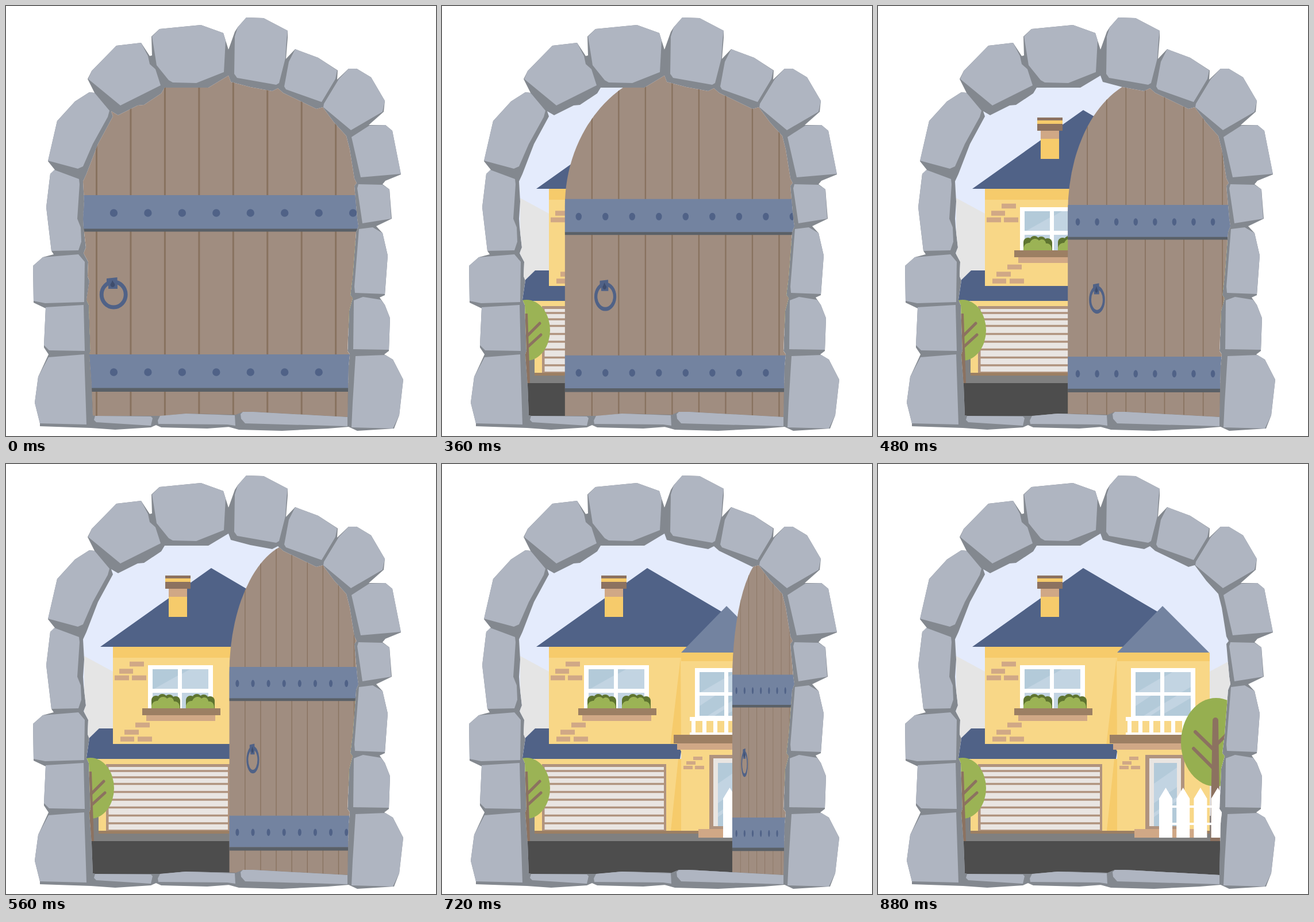
Animation of 748x748 px, one loop 920 ms. Source, as an HTML page:

```html
<!DOCTYPE html>
<html lang="en">
<head>
<meta charset="utf-8">
<title>Opening door</title>
<style>
html, body { margin: 0; width: 100%; height: 100%; overflow: hidden; background: #fff; }
svg { display: block; width: 100vw; height: 100vh; }
.wall { fill: #f8d787; } .trim { fill: #f6cb6b; }
.roof { fill: #506287; } .tan { fill: #d0a886; }
.brown { fill: #9c7f63; } .bark { fill: #8c7260; }
.frame { fill: #b0937e; } .pale { fill: #e9e5e2; }
.white { fill: #fff; } .fog { fill: #e5e5e5; }
.glass { fill: #b3cad9; } .shine { fill: #c2d4e2; }
.leaf { fill: #9bb355; } .shade { fill: #5e7430; }
.band { fill: #7383a0; } .edge { fill: #5a6067; }
.stone { fill: #afb5c1; } .gap { fill: #83888f; }
.line { fill: none; stroke: #8c7260; stroke-linecap: round; }
</style>
</head>
<body>
<svg viewBox="0 0 748 748">
  <clipPath id="opening"><path d="M387 121L391 132 425 141 463 148 473 143 482 151 540 179 551 176 571 203 592 226 598 250 606 300 610 308 606 313 611 370 613 383 609 393 603 470 599 503 603 508 597 530 594 600 598 606 596 625 594 715 430 706 412 706 400 711 313 709 272 713 155 713 151 712 149 660 145 606 147 600 144 520 140 511 145 478 142 470 143 445 135 430 139 420 135 385 134 370 136 340 134 305 140 292 160 240 186 192 183 183 195 190 229 173 240 172 270 152 276 142 352 142Z"/></clipPath>
  <clipPath id="arch"><path d="M97.3 740V342A267.5 246 0 0 1 632.4 342V740Z"/></clipPath>

  <g class="gap">
    <path d="M59 731L59 726 50 690 56 645 74 606 66 594 66 590 69 526 48 516 47 452 64 437 83 432 79 426 70 350 77 292 85 285 73 270 89 200 120 166 145 150 154 151 142 127 149 113 192 69 235 64 250 87 254 86 253 53 267 40 339 33 378 47 387 76 390 70V732L350 735 270 733 261 729 252 733 190 737 148 734Z"/>
    <path d="M387 76L398 45 403 37 418 20 448 21 490 43 490 55 487 92 503 75 543 90 577 112 576 128 596 109 610 109 635 124 659 165 657 184 631 207 660 207 672 217 687 293 660 304 655 310 667 319 671 370 644 383 655 395 664 434 659 503 650 507 659 520 668 543 666 600 658 606 673 615 691 650 684 712 675 735 611 739 596 732 560 735 480 739 405 737 387 732Z"/>
  </g>

  <g clip-path="url(#opening)">
    <path fill="#e4ebfc" d="M120 100H630V740H120Z"/>
    <path class="fog" d="M136 334L186 361V640H136ZM577 361L620 338V660H577Z"/>
    <path fill="#808080" d="M140 612H620V660H140Z"/>
    <path fill="#4d4d4d" d="M140 656H620V740H140Z"/>

    <!-- house -->
    <path class="wall" d="M186 318H416V500H186ZM161 513H416V638H161ZM416 328H577V638H416Z"/>
    <path class="trim" d="M186 318H430V337H186ZM416 328H577V343H416ZM415 337L397 490H416ZM411 513L398 638H416V513Z"/>
    <path class="roof" d="M357 181L164 318H440L495 262ZM162 460H186V487H409L416 500 414 513H130V491Z"/>
    <path class="trim" d="M416 318H428V328H416Z"/>
    <path class="band" d="M495 247L416 328H576Z"/>
    <path class="trim" d="M283 230H315V266H283ZM277 198H321V206H277Z"/>
    <path class="tan" d="M283 216H315V231H283Z"/>
    <path class="bark" d="M277 194H321V199H277ZM277 205H321V217H277Z"/>
    <path fill="none" stroke="#d0a886" stroke-width="8.5" d="M215 348h25M197 360.500h24M189 372h25M219 372h25M225 454h25M206 466.500h25M199 478.500h24M229 478.500h25"/>
    <path fill="none" stroke="#d0a886" stroke-width="6" d="M437 512h16M425 520h16M420 528h16M440 528h16"/>

    <!-- left window -->
    <path class="white" d="M247 350H360V426H247Z"/>
    <path class="glass" d="M255 357H299V391H255ZM306 357H352V391H306Z"/>
    <path class="shine" d="M258 391L299 368V391ZM306 365L320 357H352V391H306ZM255 398H299V426H255ZM306 398H352V426H306Z"/>
    <g id="bush">
      <g id="lobes" class="shade"><circle cx="261" cy="411" r="8"/><circle cx="272" cy="408" r="8"/><circle cx="284" cy="409" r="8"/><circle cx="295" cy="412" r="8"/><path d="M253 411H303V426H253Z"/></g>
      <path class="leaf" d="M253 426C252 418 256 412 264 412C267 404 276 403 280 408C286 403 292 408 292 413C299 412 303 418 302 426Z"/>
    </g>
    <use href="#bush" x="60"/>
    <path class="brown" d="M237 425H373V437H237Z"/>
    <path class="tan" d="M244 437H364V447H244Z"/>

    <!-- right window and balcony -->
    <path class="white" d="M440 355H552V440H440Z"/>
    <path class="glass" d="M448 362H491V397H448ZM498 362H544V397H498ZM448 403H491V438H448ZM498 403H544V438H498Z"/>
    <path class="shine" d="M450 397L491 373V397ZM498 370L512 362H544V388L528 397H498ZM448 403H475L448 421ZM462 438L491 420V427L474 438ZM498 416L520 403H544V407L498 434Z"/>
    <path class="white" d="M431 440H556V447H431ZM431 467H556V474H431Z"/>
    <path fill="none" stroke="#fff" stroke-width="7" d="M437.500 445v27M456.500 445v27M475.500 445v27M494.500 445v27M513.500 445v27M532.500 445v27"/>
    <path class="brown" d="M403 471H580V486H403Z"/>
    <path class="tan" d="M409 486H580V497H409Z"/>

    <!-- garage and entrance -->
    <path class="brown" d="M161 638H577V643H161Z"/>
    <path class="frame" d="M174 522H390V638H174ZM465 506H533V636H465Z"/>
    <path class="pale" d="M178.500 527H386V636H178.500ZM472 512H527V630H472Z"/>
    <path id="slats" fill="none" stroke="#b0937e" stroke-width="3.500"/>
    <path class="glass" d="M480 520H520V630H480Z"/>
    <path class="shine" d="M480 556L520 528V562L480 590ZM480 607L520 579V586L480 614Z"/>
    <path class="tan" d="M446 635H552V650H446Z"/>

    <!-- trees and fence -->
    <ellipse class="leaf" cx="147" cy="564" rx="41" ry="53"/>
    <path class="bark" d="M144 535H149L153 656H144Z"/>
    <path class="line" stroke-width="5" d="M149 573L170 552M149 593L172 572"/>
    <ellipse fill="#96af50" cx="588" cy="484" rx="61" ry="77"/>
    <path class="bark" d="M582 446a5 5 0 0 1 10 0L595 656H578Z"/>
    <path class="line" stroke-width="6" d="M552 466L586 499M549 495L584 530M588 489L608 469"/>
    <path class="white" d="M490 594H610V598H490ZM490 624H610V628H490Z"/>
    <path id="pickets" class="white"/>

    <!-- door -->
    <g id="door">
      <g clip-path="url(#arch)">
        <path fill="#a08d80" d="M90 60H640V740H90Z"/>
        <path id="planks" fill="none" stroke="#88725f" stroke-width="3"/>
        <path class="band" d="M90 329H640V388H90ZM90 606H640V665H90Z"/>
        <path class="edge" d="M90 387.500H640V392.500H90ZM90 664.500H640V671H90Z"/>
        <path id="rivets" fill="none" stroke="#506287" stroke-width="13.400" stroke-linecap="round"/>
      </g>
      <ellipse cx="187.200" cy="502" rx="21" ry="22" fill="none" stroke="#506287" stroke-width="6.800"/>
      <path class="roof" d="M175 474L193.500 472 194 492H178V481L175 480Z"/>
      <path fill="#3f4d6d" d="M185 477L188 482A4 4 0 1 1 183 482Z"/>
    </g>
  </g>

  <g class="stone">
    <path d="M418 20L448 21 490 43 488 60 486 91 475 134 470 137 402 125 397 118 398 53 403 37Z"/>
    <path d="M503 75L543 90 576 112 573 127 549 167 487 145 484 140 492 97Z"/>
    <path d="M596 109L610 109 635 124 659 165 655 184 600 216 552 176 553 170 579 127Z"/>
    <path d="M632 208L660 207 672 217 687 292 617 298 601 228Z"/>
    <path d="M613 310L655 311 667 319 670 370 620 378 611 317Z"/>
    <path d="M614 388L638 385 655 395 664 434 659 501 607 499 606 488Z"/>
    <path d="M605 512L621 506 652 511 659 520 668 543 666 598 604 597Z"/>
    <path d="M608 609L660 607 673 615 691 650 684 712 673 735 601 733 603 690Z"/>
    <path d="M267 40L339 33 378 47 382 60 379 115 331 134 290 133 283 129 262 103 254 53Z"/>
    <path d="M192 69L235 64 247 87 250 101 260 110 269 138 199 173 143 127 149 113Z"/>
    <path d="M145 150L154 151 180 182 177 193 151 240 134 279 125 283 73 269 89 200 120 166Z"/>
    <path d="M84 285L127 301 128 310 124 370 130 385 131 410 126 425 79 426 70 350 77 292Z"/>
    <path d="M64 437L126 432 137 445 136 515 68 517 48 513 47 452Z"/>
    <path d="M69 524L135 520 137 600 75 599 66 590Z"/>
    <path d="M74 611L136 606 140 728 59 726 50 690 56 645Z"/>
    <path d="M155 713L252 714 255 717 252 730 157 724 153 720Z"/>
    <path d="M268 713L313 709 398 712 399 730 385 728 265 727 264 721Z"/>
    <path d="M412 706L430 706 594 715V731L416 726 409 718 408 710Z"/>
  </g>
</svg>
<script>
const el = id => document.getElementById(id);
const repeat = (id, count, part) =>
  el(id).setAttribute('d', Array.from({ length: count }, (_, i) => part(i)).join(''));

const slatY = [534, 545, 556.5, 570.5, 584, 597.5, 611.5, 625];
repeat('slats', slatY.length, i => `M178 ${slatY[i]}H387`);
repeat('pickets', 4, i => `M${489 + 30.2 * i} 650v-68l11.500 -19 11.500 19v68z`);
repeat('planks', 8, i => `M${157.5 + 59.45 * i} 60V740`);
repeat('rivets', 9, i => {
  const x = 128 + 59.45 * i;
  return `M${x} 360h.01M${x} 637h.01`;
});

const LOOP = 920, STEP = 40, START = 280;
const HINGE = 632.4, BASE = 693.5;
const door = el('door');

function draw(now) {
  const n = Math.max(0, Math.floor((now % LOOP - START) / STEP));
  // The door swings at double speed for the first three steps.
  const swing = n < 3 ? 2 * n : n + 3;
  const sx = Math.max(0, 1 - 0.0544 * swing), sy = 1 - 0.00936 * n;
  door.setAttribute('transform',
    `matrix(${sx} 0 0 ${sy} ${HINGE * (1 - sx)} ${BASE * (1 - sy)})`);
  door.style.display = n < 15 ? '' : 'none';
}

const t0 = performance.now();
function tick() {
  draw(performance.now() - t0);
  requestAnimationFrame(tick);
}
tick();
</script>
</body>
</html>
```
